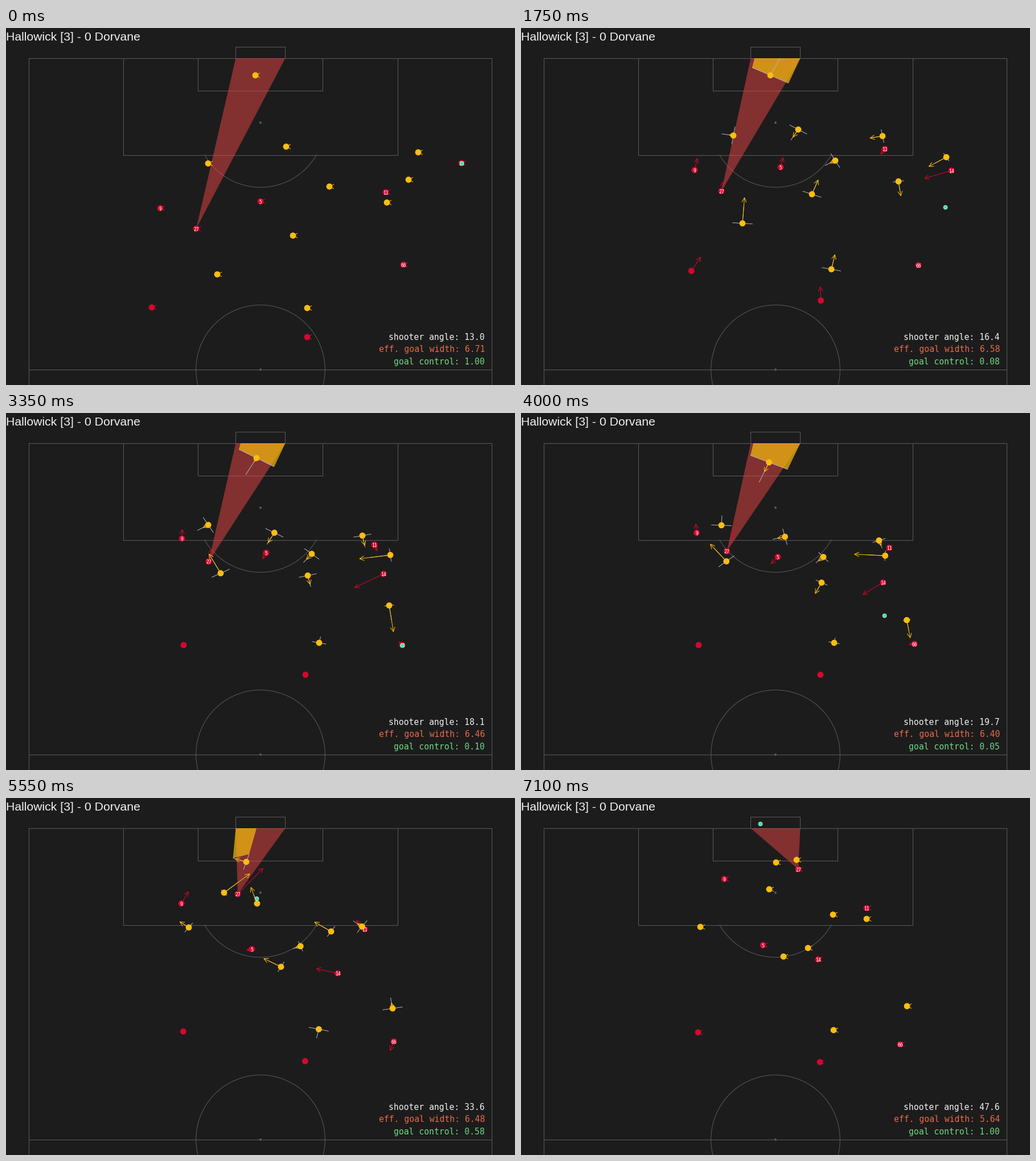
These frames come from a looping animation (894 px wide and 626 px high, 7450 ms). A matplotlib script:

```python
import numpy as np
import matplotlib.pyplot as plt
from matplotlib.animation import FuncAnimation
from matplotlib.collections import EllipseCollection, LineCollection, PolyCollection
from matplotlib.patches import Polygon

W, H, DPI = 894, 626, 64
PX = 72 / DPI                      # points per pixel
FRAMES, STEP, LAST = 149, 50, 142

BG, CHALK, GREY = "#1c1c1c", "#5a5a5a", "#b4b4b4"
RED, YELLOW, TEAL = "#d8062f", "#fbbd10", "#3fe0b4"
SCALE = np.array([11.88, 10.3])    # pixels per metre
LEFT, RIGHT, GOAL_Y = 403.5, 490.5, 53


class Path:
    """Natural cubic spline through a few (time, x, y) points."""

    def __init__(self, *keys):
        keys = np.array(keys, float)
        self.t, self.p = keys[:, 0], keys[:, 1:]
        n, h = len(keys), np.diff(self.t)
        slope = np.diff(self.p, axis=0) / h[:, None]
        system, rhs = np.eye(n), np.zeros((n, 2))
        for i in range(1, n - 1):
            system[i, i - 1:i + 2] = h[i - 1], 2 * (h[i - 1] + h[i]), h[i]
            rhs[i] = 6 * (slope[i] - slope[i - 1])
        self.bend = np.linalg.solve(system, rhs)

    def at(self, t):
        i = min(np.searchsorted(self.t, t, side="right"), len(self.t) - 1)
        h = self.t[i] - self.t[i - 1]
        u = (t - self.t[i - 1]) / h
        a = 1 - u
        (p, q), (m, n) = self.p[i - 1:i + 1], self.bend[i - 1:i + 1]
        pos = a * p + u * q + h * h / 6 * ((a**3 - a) * m + (u**3 - u) * n)
        vel = (q - p) / h + h / 6 * ((1 - 3 * a * a) * m + (3 * u * u - 1) * n)
        return pos, vel


class Jog:
    """Slow to a halt, then step back a little."""

    def __init__(self, start, end):
        self.start, self.way = np.array(start, float), np.subtract(end, start)

    def at(self, t):
        pos, vel = self.start, 0.005 * self.way
        for way, begin, span in [(self.way, 0, 3.35), (np.array([-1, 4]), 4.6, 2.5)]:
            left = 1 - np.clip((t - begin) / span, 0, 1)
            pos = pos + way * (1 - left**2)
            if t >= begin:
                vel = vel + 2 * left * way / span
        return pos, vel


shooter = Path((0, 334, 352), (0.65, 344, 316), (1.75, 352, 286), (3.35, 356, 260.5),
               (4.6, 373, 217.5), (5.55, 407, 168.5), (7.1, 487, 125))
winger = Path((0, 800, 237), (1.75, 756, 250), (3.35, 663, 282), (4.6, 616, 307),
              (7.1, 522, 283))
back = Path((0, 698, 415), (1.75, 698, 416), (3.35, 696, 407), (4.6, 686, 409),
            (5.55, 681, 427), (7.1, 666, 432))
attack = [
    ("27", shooter), ("14", winger), ("66", back),
    ("9", Path((0, 271, 316), (0.65, 292, 281), (1.75, 305, 249), (4.6, 307, 201),
               (5.55, 308, 185), (7.1, 357, 142))),
    ("5", Path((0, 447, 304), (1.75, 456, 244), (3.35, 457, 245), (5.55, 432, 265),
               (7.1, 425, 258))),
    ("11", Path((0, 667, 288), (0.65, 657, 230), (1.75, 639, 212), (3.35, 647, 231),
                (5.55, 630, 230), (7.1, 607, 193))),
    ("", Jog((256, 490), (312, 407))),
    ("", Jog((529, 542), (526, 459))),
]

keeper = Path((0, 438, 83), (1.75, 438, 83), (3.35, 440, 79), (4.6, 431, 98.5),
              (5.55, 422, 112), (6.1, 413, 105), (7.1, 448, 113))
defence = [
    keeper,
    Path((0, 355, 237.5), (0.65, 370, 206), (1.75, 373, 188.5), (4.6, 356, 191),
         (5.55, 383, 166), (7.1, 484, 108.5)),
    Path((0, 492, 208), (0.65, 494, 182.5), (1.75, 487, 178), (4.6, 455, 212.5),
         (5.55, 441, 185), (7.1, 436, 160)),
    Path((0, 568, 278), (0.65, 562, 245), (1.75, 552, 232.5), (3.35, 537, 247),
         (7.1, 504, 263)),
    Path((0, 724, 218), (0.65, 754, 215), (1.75, 747, 226.5), (3.35, 675, 249),
         (5.55, 571, 234), (7.1, 548, 204.5)),
    Path((0, 707, 266), (0.65, 674, 215), (1.75, 635, 189.5), (3.35, 626, 215),
         (4.6, 630, 227), (7.1, 607, 212)),
    Path((0, 669, 306), (0.65, 663, 272), (1.75, 663, 269), (3.35, 673, 337.5),
         (4.6, 680, 375), (5.55, 679, 369), (7.1, 678, 365)),
    Path((0, 504, 364), (1.75, 511, 291.5), (3.35, 530, 285), (4.6, 516, 305),
         (5.55, 483, 296), (7.1, 461, 278)),
    Path((0, 371, 432), (1.75, 389, 342.5), (3.35, 377, 281), (5.55, 321, 227),
         (7.1, 315, 226)),
    Jog((529, 491), (550, 403)),
]


# The ball is carried for a spell, then travels straight to the next spell.
CARRIES = [(0, 1.1, winger), (2.65, 3.56, back), (5.72, 6.4, shooter)]
SHOT = (6.78, np.array([419.5, 45]))


def carried(owner, t):
    return owner.at(t)[0] + np.array([3, -5]) * (owner is shooter)


def ball_at(t):
    stops = []
    for start, end, owner in CARRIES:
        if start <= t <= end:
            return carried(owner, t)
        stops += [(start, carried(owner, start)), (end, carried(owner, end))]
    stops.append(SHOT)
    times, points = zip(*stops)
    return np.array([np.interp(t, times, axis) for axis in np.transpose(points)])


def arrow(p, v):
    """Shaft and open head; a still player keeps a head opening to the right."""
    speed = np.hypot(*v)
    d = v / speed if speed else np.array([-1.0, 0])
    size = min(1, speed / 6) if speed else 1
    side = np.array([-d[1], d[0]])
    tip = p + v
    barbs = [tip - size * (8 * d - 4 * s * side) for s in (1, -1)]
    return [[p, tip], [barbs[0], tip, barbs[1]]]


def reach(p, v, ball, factor):
    """Tips of the area a defender can block: left, right and forward."""
    v = v / SCALE
    speed = np.hypot(*v)
    d = v / speed
    side = np.array([-d[1], d[0]])
    half = factor * min(1.5, 0.38 + 0.00464 * np.hypot(*(p - ball)))
    ahead = half + 0.4 * speed
    return [p - half * side * SCALE, p + half * side * SCALE, p + ahead * d * SCALE]


def project(eye, p):
    return eye[0] + (p[0] - eye[0]) * (eye[1] - GOAL_Y) / (eye[1] - p[1])


def shadow(eye, p, tips):
    """Blocked part of the goal mouth as a polygon, or None."""
    if p[1] > eye[1] - 4 or not LEFT - 8 < project(eye, p) < RIGHT + 8:
        return None
    seen = sorted((project(eye, q), *q) for q in tips if q[1] < eye[1] - 2)
    if len(seen) < 2:
        return None
    a, b = seen[0], seen[-1]
    x0, x1 = np.clip([a[0], b[0]], LEFT, RIGHT)
    if x1 <= x0:
        return None
    return [a[1:], (x0, GOAL_Y), (x1, GOAL_Y), b[1:]]


def open_share(shades):
    """Share of the goal line no shadow covers."""
    free, edge = 0, LEFT
    for x0, x1 in sorted((s[1][0], s[2][0]) for s in shades):
        free += max(0, x0 - edge)
        edge = max(edge, x1)
    return (free + RIGHT - edge) / (RIGHT - LEFT)


def shot_view(eye):
    posts = (np.array([[LEFT, GOAL_Y], [RIGHT, GOAL_Y]]) - eye) / SCALE
    a, b = np.arctan2(posts[:, 0], -posts[:, 1])
    angle = b - a
    return np.degrees(angle), 2 * np.hypot(*posts.T).min() * np.sin(angle / 2)


fig = plt.figure(figsize=(W / DPI, H / DPI), dpi=DPI, facecolor=BG)
ax = fig.add_axes([0, 0, 1, 1])
ax.set(xlim=(0, W), ylim=(H, 0))
ax.axis("off")


def chalk(x, y):
    ax.plot(x, y, color=CHALK, lw=PX, zorder=1)


def box(x0, x1, y0, y1):
    chalk([x0, x0, x1, x1, x0], [y0, y1, y1, y0, y0])


def arc(cy, a0, a1):
    a = np.linspace(a0, a1, 120)
    chalk(447 + 113.3 * np.cos(a), cy + 113.3 * np.sin(a))


def lines(color, z):
    return ax.add_collection(LineCollection([], colors=color, linewidths=PX, zorder=z))


def dots(n, color, z, r, edge="none"):
    size = [2 * r] * n
    return ax.add_collection(EllipseCollection(
        size, size, [0] * n, units="xy", offsets=np.zeros((n, 2)),
        offset_transform=ax.transData, facecolors=color, edgecolors=edge,
        linewidths=0.7 * PX, zorder=z))


def write(x, y, size, color, text="", font="DejaVu Sans Mono", **kw):
    return ax.text(x, y, text, fontsize=size * PX, color=color, family=font, **kw)


box(40, 853, GOAL_Y, 700)
box(206, 688, GOAL_Y, 223)
box(337, 556, GOAL_Y, 110)
box(403, 490, 33, GOAL_Y)
chalk([40, 853], [599, 599])
arc(599, 0, 2 * np.pi)
corner = np.arcsin(56.5 / 113.3)
arc(166, corner, np.pi - corner)
dots(2, CHALK, 1, 2).set_offsets([(447, 166), (447, 599)])

cone = ax.add_patch(Polygon([(0, 0)] * 3, fc="#e84444", alpha=0.5, lw=0, zorder=2))
shade = ax.add_collection(PolyCollection([], facecolors="#f5bc0e", alpha=0.7,
                                         linewidths=0, zorder=3))
bars = lines(GREY, 4)
red_arrows, yellow_arrows = lines(RED, 5), lines(YELLOW, 5)
red_dots = dots(len(attack), RED, 6, 5.4)
yellow_dots = dots(len(defence), YELLOW, 6, 5.4)
ball_dot = dots(1, TEAL, 9, 3.5, "#e8fff8")
numbers = [write(0, 0, 8, "white", label, ha="center", va="center_baseline", zorder=7)
           for label, _ in attack]

write(0, 21.5, 21.3, "#f0f0f0", "Hallowick [3] - 0 Dorvane", "Liberation Sans")
stats = [write(841, y, 14.72, c, ha="right")
         for y, c in [(547, "#f0f0f0"), (568, "#e8694a"), (590, "#6ed882")]]


def draw(i):
    t = min(i, LAST) * STEP / 1000
    moving = 0 < i < LAST
    ball = ball_at(t)
    eye = shooter.at(t)[0]

    def states(paths):
        return [(p, v * moving) for p, v in (path.at(t) for path in paths)]

    reds, yellows = states(path for _, path in attack), states(defence)
    segments, shades = [], []
    for path, (p, v) in zip(defence, yellows):
        if not moving:
            break
        tips = reach(p, v, ball, 2 if path is keeper else 1)
        segments += [tips[:2], [p, tips[2]]]
        poly = shadow(eye, p, tips)
        if poly:
            shades.append(poly)

    cone.set_xy([eye, (LEFT, GOAL_Y), (RIGHT, GOAL_Y)])
    shade.set_verts(shades)
    bars.set_segments(segments)
    for team, heads, marks in [(reds, red_arrows, red_dots),
                               (yellows, yellow_arrows, yellow_dots)]:
        heads.set_segments([s for p, v in team for s in arrow(p, v)])
        marks.set_offsets([p for p, _ in team])
    for label, (p, _) in zip(numbers, reds):
        label.set_position(p + [0, 0.5])
    ball_dot.set_offsets([ball])

    angle, width = shot_view(eye)
    stats[0].set_text(f"shooter angle: {angle:.1f}")
    stats[1].set_text(f"eff. goal width: {width:.2f}")
    stats[2].set_text(f"goal control: {open_share(shades):.2f}")
    return []


anim = FuncAnimation(fig, draw, frames=FRAMES, init_func=lambda: [], interval=STEP,
                     repeat=True, repeat_delay=0, blit=False)
plt.show()
```
